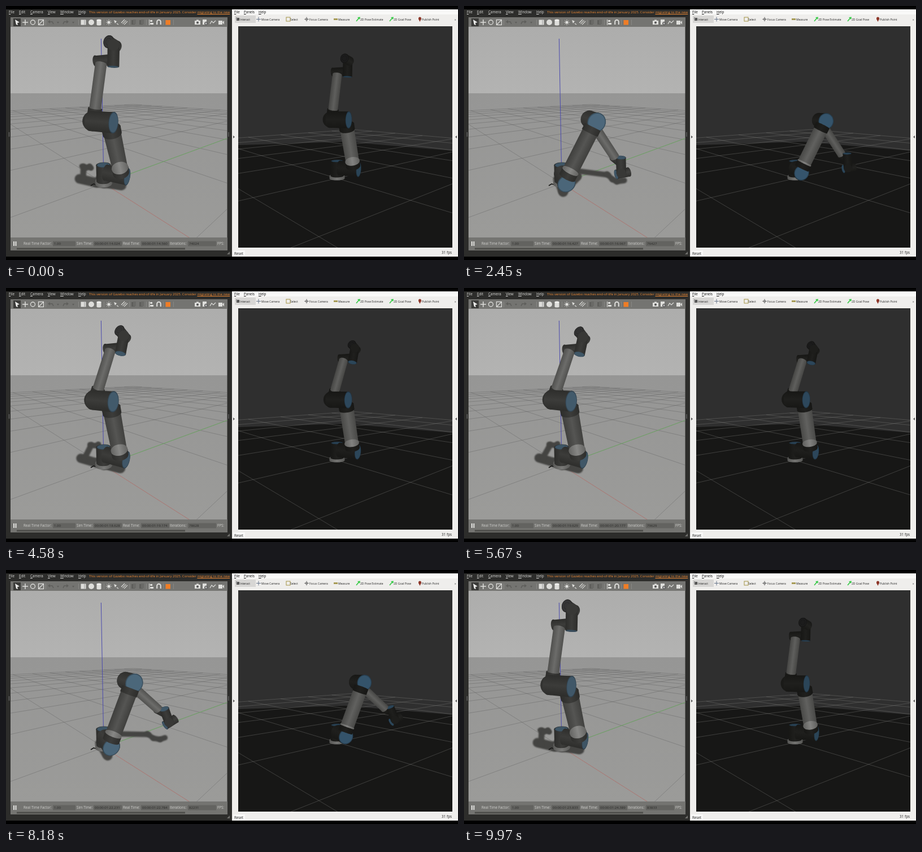
Animation of 800 by 451 pixels, one loop 10 s. Source, as an HTML page with a canvas:

```html
<!DOCTYPE html>
<html lang="en">
<head>
<meta charset="utf-8">
<title>Robot arm, two views</title>
<style>
html, body { margin: 0; width: 100%; height: 100%; overflow: hidden; background: #000; }
#stage { position: relative; width: 800px; height: 451px; overflow: hidden; }
canvas { position: absolute; left: 0; top: 0; }
#stage span { position: absolute; white-space: pre; line-height: 10px; font-family: "Open Sans", "Noto Sans", sans-serif; }
#stage u { text-decoration-thickness: .5px; text-underline-offset: 1px; }
</style>
</head>
<body>
<div id="stage"><canvas id="view" width="800" height="451"></canvas></div>
<script>
const stage = document.getElementById('stage');
const canvas = document.getElementById('view');
const ctx = canvas.getContext('2d');
const LOOP = 10000, PERIOD = 5000, LEAD = 110;
const rad = deg => deg * Math.PI / 180;

// Cameras: focal length, image centre, where the robot base appears and how far away it is.
const leftCam = {
  f: 331, cx: 200, cy: 224, pitch: rad(11.8), yaw: rad(129.5), base: [173, 315], z0: 1.95,
  tube: 79, fore: 100, hub: 56, ring: 125, cap: [78, 106, 126]
};
const rightCam = {
  f: 474, cx: 600, cy: 232.5, pitch: rad(6.2), yaw: rad(132), base: [586, 306], z0: 3.1,
  tube: 90, fore: 88, hub: 29, ring: 120, cap: [54, 86, 110]
};
let cam = leftCam;

// ---- 3D helpers, in metres with z up ----
const UP = [0, 0, 1];
const add = (p, d, k = 1) => p.map((v, i) => v + d[i] * k);
const flip = d => d.map(v => -v);
const mix = (a, b, k) => a.map((v, i) => v + (b[i] - v) * k);

function toCam([x, y, z]) {
  const r = x * Math.cos(cam.yaw) - y * Math.sin(cam.yaw);
  const q = x * Math.sin(cam.yaw) + y * Math.cos(cam.yaw);
  const sin = Math.sin(cam.pitch), cos = Math.cos(cam.pitch);
  return [
    (cam.base[0] - cam.cx) / cam.f * cam.z0 + r,
    (cam.base[1] - cam.cy) / cam.f * cam.z0 - sin * q - cos * z,
    cam.z0 + cos * q - sin * z
  ];
}
const screen = ([x, y, z]) => [cam.cx + cam.f * x / z, cam.cy + cam.f * y / z];
const project = p => screen(toCam(p));
const depth = p => Math.hypot(...toCam(p));
const pixels = (r, p) => r * cam.f / toCam(p)[2];

// ---- drawing helpers ----
const gray = v => { v = Math.round(v); return `rgb(${v},${v},${v - 2})`; };
function rect(x, y, w, h, fill) { ctx.fillStyle = fill; ctx.fillRect(x, y, w, h); }
function path(points, color, width) {
  ctx.beginPath();
  points.forEach(p => ctx.lineTo(p[0], p[1]));
  ctx.strokeStyle = color;
  ctx.lineWidth = width;
  ctx.stroke();
}
function shape(points, fill) {
  ctx.beginPath();
  points.forEach(p => ctx.lineTo(p[0], p[1]));
  ctx.fillStyle = fill;
  ctx.fill();
}
function oval(x, y, rx, ry, fill, stroke, width = 1) {
  ctx.beginPath();
  ctx.ellipse(x, y, rx, ry, 0, 0, 2 * Math.PI);
  if (fill) { ctx.fillStyle = fill; ctx.fill(); }
  if (stroke) { ctx.strokeStyle = stroke; ctx.lineWidth = width; ctx.stroke(); }
}
function fade(y0, y1, a, b) {
  const g = ctx.createLinearGradient(0, y0, 0, y1);
  g.addColorStop(0, a);
  g.addColorStop(1, b);
  return g;
}
function clipped(x, y, w, h, draw) {
  ctx.save();
  ctx.beginPath();
  ctx.rect(x, y, w, h);
  ctx.clip();
  draw();
  ctx.restore();
}
function label(x, base, size, color, html) {
  const el = document.createElement('span');
  el.style.cssText = `left:${x}px;top:${base - 5 - size * .36}px;font-size:${size}px;color:${color}`;
  el.innerHTML = html;
  stage.append(el);
  return el;
}

function line3(a, b, color, width) {
  const near = .2;
  let u = toCam(a), v = toCam(b);
  if (u[2] < near && v[2] < near) return;
  if (u[2] < near) u = mix(u, v, (near - u[2]) / (v[2] - u[2]));
  if (v[2] < near) v = mix(v, u, (near - v[2]) / (u[2] - v[2]));
  path([screen(u), screen(v)], color, width);
}
function grid(n, color) {
  for (let k = -n; k <= n; k++) {
    line3([-n, k, 0], [n, k, 0], color, .6);
    line3([k, -n, 0], [k, n, 0], color, .6);
  }
}
function disc(c, n, r, fill) {
  const side = Math.abs(n[2]) > .99 ? [1, 0, 0] : [-n[1], n[0], 0];
  const len = Math.hypot(...side), e = side.map(v => v / len);
  const g = [n[1] * e[2] - n[2] * e[1], n[2] * e[0] - n[0] * e[2], n[0] * e[1] - n[1] * e[0]];
  const rim = [];
  for (let i = 0; i < 32; i++) {
    const t = i * Math.PI / 16;
    rim.push(project(add(add(c, e, r * Math.cos(t)), g, r * Math.sin(t))));
  }
  shape(rim, fill);
}
// Coloured end plate, shown only when it faces the camera.
function plate(c, n, r, rgb) {
  const at = toCam(c), d = add(toCam(add(c, n)), at, -1);
  const facing = -(d[0] * at[0] + d[1] * at[1] + d[2] * at[2]) / Math.hypot(...at);
  if (facing <= 0) return;
  const shade = k => `rgb(${rgb.map(v => Math.round(v * k * (.68 + .32 * facing)))})`;
  disc(c, n, r, shade(.78));
  disc(c, n, r * .9, shade(1));
}
function ball(p, r, tone) {
  const [x, y] = project(p), w = pixels(r, p);
  oval(x, y, w, w, gray(tone));
}
function tube(a, b, r, tone) {
  const len = Math.hypot(...add(b, a, -1)), n = add(b, a, -1).map(v => v / len);
  const edge = gray(tone * .8);
  const p = project(a), q = project(b), wa = pixels(r, a), wb = pixels(r, b);
  const dx = q[0] - p[0], dy = q[1] - p[1], d = Math.hypot(dx, dy) || 1;
  const nx = -dy / d, ny = dx / d, w = Math.max(wa, wb);
  const g = ctx.createLinearGradient(p[0] - nx * w, p[1] - ny * w, p[0] + nx * w, p[1] + ny * w);
  g.addColorStop(0, edge);
  g.addColorStop(.5, gray(tone * 1.08));
  g.addColorStop(1, edge);
  disc(a, n, r, g);
  disc(b, n, r, g);
  shape([
    [p[0] - nx * wa, p[1] - ny * wa], [p[0] + nx * wa, p[1] + ny * wa],
    [q[0] + nx * wb, q[1] + ny * wb], [q[0] - nx * wb, q[1] - ny * wb]
  ], g);
}

// ---- robot ----
// Joint positions for swing s, from upright (0) to folded down (1).
function pose(s) {
  const turn = -rad(25 + 51 * s) - leftCam.yaw;
  const axis = [Math.cos(turn), Math.sin(turn), 0];
  const dir = deg => [-axis[1] * Math.cos(rad(deg)), axis[0] * Math.cos(rad(deg)), Math.sin(rad(deg))];
  const upper = dir(113 - 51 * s), fore = dir(74 - 131 * s);
  const drop = dir(88 - 175 * s), tool = dir(178 - 175 * s);
  const shoulder = [0, 0, .127];
  const elbow = add(shoulder, upper, .612);
  const wrist = add(elbow, fore, .53);
  const knuckle = add(wrist, axis, .164);
  const hand = add(knuckle, drop, .116);
  return { axis, upper, fore, drop, tool, shoulder, elbow, wrist, knuckle, hand };
}

function drawArm(j) {
  const { axis, upper, fore, drop, tool } = j, { hub, cap } = cam;
  const out = (p, k) => add(p, axis, k);
  const parts = [];
  const part = (mid, draw) => parts.push([depth(mid), draw]);

  part([0, 0, .08], () => {
    tube([0, 0, 0], [0, 0, .03], .088, cam.ring * .9);
    tube([0, 0, .03], [0, 0, .205], .075, hub);
    plate([0, 0, .205], UP, .068, cap);
  });
  part(out(j.shoulder, .16), () => {
    tube(out(j.shoulder, .03), out(j.shoulder, .262), .083, hub);
    plate(out(j.shoulder, .265), axis, .082, cap);
  });
  const upperArm = out(j.shoulder, .205);
  part(add(upperArm, upper, .3), () => {
    const at = k => add(upperArm, upper, k);
    tube(at(.04), at(.1), .08, hub);
    tube(at(.1), at(.5), .074, cam.tube);
    tube(at(.1), at(.112), .079, cam.ring);
    tube(at(.5), at(.56), .08, hub);
  });
  part(out(j.elbow, .12), () => {
    ball(out(j.elbow, .04), .086, hub * .9);
    tube(out(j.elbow, .02), out(j.elbow, .237), .086, hub);
    plate(out(j.elbow, .24), axis, .087, cap);
  });
  const foreArm = out(j.elbow, .049);
  part(add(foreArm, fore, .28), () => {
    const at = k => add(foreArm, fore, k);
    tube(at(.05), at(.11), .06, hub);
    tube(at(.11), at(.5), .05, cam.fore);
  });
  part(out(j.wrist, .07), () => {
    plate(out(j.wrist, -.012), flip(axis), .046, cap);
    tube(out(j.wrist, -.01), out(j.wrist, .16), .047, hub);
  });
  part(mix(j.knuckle, j.hand, .4), () => {
    tube(add(j.knuckle, drop, -.055), j.hand, .05, hub);
    plate(add(j.knuckle, drop, -.058), flip(drop), .049, cap);
    ball(j.hand, .049, hub);
  });
  part(add(j.hand, tool, .02), () => {
    tube(add(j.hand, tool, -.055), add(j.hand, tool, .085), .048, hub * 1.05);
    plate(add(j.hand, tool, -.058), flip(tool), .048, cap);
    plate(add(j.hand, tool, .087), tool, .046, [hub, hub, hub]);
    plate(add(j.hand, tool, .088), tool, .026, [hub, hub, hub]);
  });
  parts.sort((a, b) => b[0] - a[0]).forEach(p => p[1]());
}

function drawShadow(j) {
  const cast = p => [p[0] + .52 * p[2], p[1] - .1 * p[2], 0];
  const out = (p, k) => add(p, j.axis, k);
  const limb = (a, b, r) => {
    const u = cast(a), v = cast(b);
    path([project(u), project(v)], '#444442', 1.3 * pixels(r, u));
  };
  ctx.save();
  ctx.filter = 'blur(1.2px)';
  ctx.lineCap = 'round';
  limb([0, 0, 0], [0, 0, .2], .075);
  limb(j.shoulder, out(j.shoulder, .24), .08);
  limb(out(j.shoulder, .22), out(j.elbow, .22), .07);
  limb(j.elbow, out(j.elbow, .22), .08);
  limb(out(j.elbow, .049), out(j.wrist, .049), .05);
  limb(out(j.wrist, .02), j.knuckle, .047);
  limb(j.knuckle, j.hand, .047);
  limb(j.hand, add(j.hand, j.tool, .09), .047);
  ctx.restore();
  path([[150, 319], [155, 316], [166, 319]], '#1b1b1a', 1.8);
}

// ---- fixed scenery and window frames ----
function leftScene() {
  rect(8, 37, 384, 118, fade(37, 155, '#adadac', '#b3b3b2'));
  rect(8, 155, 384, 257, fade(155, 411, '#969695', '#9b9b99'));
  cam = leftCam;
  grid(10, 'rgba(85,85,84,.6)');
  line3([0, 0, 0], [0, -10, 0], '#6fa765', 1);
  line3([0, 0, 0], [-10, 0, 0], '#b87c78', .9);
  line3([0, 0, 0], [0, 0, 1.4], '#4a4aae', 1);
}
function rightScene() {
  rect(411, 36, 379, 393, '#2f2f2f');
  shape([[411, 247], [600, 241], [790, 257], [790, 429], [411, 429]], '#171716');
  cam = rightCam;
  grid(5, 'rgba(135,135,132,.6)');
}

function leftIcons() {
  const c = '#dededb', dim = '#5e5e5b';
  rect(13, 22, 13, 14, '#3a3a38');
  shape([[16, 24], [24, 29], [20, 30], [21, 34], [18, 33]], '#eeeeec');
  path([[34, 24], [34, 34]], c, 1.5);
  path([[29, 29], [39, 29]], c, 1.5);
  oval(47.5, 29, 4, 4, null, c, 1.3);
  path([[58, 33], [66, 25]], c, 1.3);
  ctx.strokeRect(57.5, 24.5, 9, 9);
  for (const [x, d] of [[79, 1], [106, -1]]) {
    path([[x + 5 * d, 32], [x + 3 * d, 28], [x - 3 * d, 28]], dim, 1.5);
    shape([[x - 5 * d, 28], [x - d, 25], [x - d, 31]], dim);
    shape([[x + 11, 28], [x + 15, 28], [x + 13, 31]], dim);
  }
  rect(132.5, 24.5, 9, 9, c);
  path([[139, 25], [139, 33]], '#999', 1);
  oval(151, 29, 5, 5, c);
  rect(160.5, 25, 8, 8, c);
  oval(164.5, 25, 4, 1.5, '#f2f2f0');
  oval(164.5, 33, 4, 1.5, c);
  oval(182, 29, 2.6, 2.6, c);
  for (let i = 0; i < 8; i++) {
    const u = Math.cos(i * Math.PI / 4), v = Math.sin(i * Math.PI / 4);
    path([[182 + 3.5 * u, 29 + 3.5 * v], [182 + 5 * u, 29 + 5 * v]], c, 1);
  }
  shape([[191, 25], [196, 27], [193, 31]], c);
  path([[196, 31], [199, 33]], c, 1.2);
  for (let i = 0; i < 3; i++) path([[204 + i * 2.5, 30 + i * 1.6], [210 + i * 2.5, 24 + i * 1.6]], c, 1.1);
  for (const x of [226, 240]) { rect(x - 4, 25, 6, 8, dim); rect(x - 1, 24, 5, 8, '#6a6a67'); }
  rect(253, 24, 1, 10, c); rect(255, 25, 4, 3, c); rect(255, 30, 6, 3, c);
  ctx.beginPath();
  ctx.arc(270.5, 28, 3.3, Math.PI, 0);
  ctx.lineTo(273.8, 33);
  ctx.moveTo(267.2, 28);
  ctx.lineTo(267.2, 33);
  ctx.lineWidth = 2;
  ctx.stroke();
  rect(282.5, 25, 8.5, 8.5, '#ef7d26');
  for (const x of [70, 128, 173, 218, 248, 278, 296]) rect(x, 24, .7, 10, '#90908d');
  rect(334, 26, 10, 7, c); rect(337, 24.5, 4, 2, c); oval(339, 29.5, 2, 2, '#555');
  rect(348, 24, 7, 9, c); oval(354, 31, 2.5, 2.5, '#aaa', '#444');
  path([[361, 32], [364, 27], [367, 30], [371, 26]], c, 1.2);
  rect(376, 26, 7, 7, c);
  shape([[383, 29], [386, 26], [386, 33]], c);
}

function rightIcons() {
  const cross = (x, c) => { path([[x - 4, 23.5], [x + 4, 23.5]], c, 1); path([[x, 19.5], [x, 27.5]], c, 1); };
  rect(405, 17, 37, 13, '#d7d6d4');
  rect(408, 21, 5, 5, '#555');
  rect(407, 20, 2, 4, '#999');
  cross(447, '#66748a');
  ctx.strokeStyle = '#a39444';
  ctx.strokeRect(496, 20, 7, 7);
  cross(532, '#777');
  oval(532, 23.5, 2, 2, null, '#777');
  rect(580, 22, 7, 3, '#a79b55');
  for (const x of [623, 682]) {
    path([[x - 3, 27], [x + 2, 21]], '#35ca45', 1.6);
    shape([[x + 4, 19.5], [x + 3, 24], [x - 1, 20]], '#35ca45');
  }
  oval(732.5, 22, 2.5, 2.5, '#8d3527');
  shape([[730, 23], [735, 23], [732.5, 28]], '#8d3527');
}

function chrome() {
  rect(0, 0, 800, 451, '#000');
  rect(0, 6, 400, 439, '#2d2d2b');
  rect(8, 20, 384, 17, '#747471');
  rect(8, 411, 384, 23, '#747471');
  for (const [x, w] of [[83, 40], [155, 50], [239, 50], [322, 50]]) rect(x, 417.5, w, 9, '#636360');
  rect(13, 418, 2, 8, '#e4e4e1');
  rect(16.5, 418, 2, 8, '#e4e4e1');
  rect(19, 429.5, 298, 3, '#4e4e4b');
  for (const x of [5, 393.5]) rect(x, 224, 1, 8, '#777');
  shape([[391, 441], [396, 436], [396, 441]], '#70706d');
  rect(400, 6, 400, 439, '#efeeec');
  rect(400, 6, 400, 9, '#f9f9f8');
  rect(402, 434, 21, 10, '#f8f8f7');
  shape([[402, 230], [405, 232.5], [402, 235]], '#555');
  shape([[798, 230], [795, 232.5], [798, 235]], '#555');
  leftIcons();
  rightIcons();
}
const inLeft = draw => clipped(8, 37, 383.5, 374, draw);
const inRight = draw => clipped(411, 36, 379, 393, draw);

function labels() {
  const menu = (items, base, size, color) => items.forEach(([x, t]) =>
    label(x, base, size, color, `<u>${t[0]}</u>${t.slice(1)}`));
  menu([[5, 'File'], [23, 'Edit'], [43, 'Camera'], [74, 'View'], [96, 'Window'], [128, 'Help']], 13.6, 6.3, '#dcdcda');
  menu([[404, 'File'], [421, 'Panels'], [447, 'Help']], 12.8, 6.2, '#111');
  const note = label(147, 13.6, 6, '#ef8a35',
    'This version of Gazebo reaches end-of-life in January 2025. Consider <u>migrating to the new</u>');
  note.style.width = '253px';
  note.style.overflow = 'hidden';
  [[414, 'Interact'], [452, 'Move Camera'], [503, 'Select'], [537, 'Focus Camera'], [588, 'Measure'],
   [627, '2D Pose Estimate'], [686, '2D Goal Pose'], [736, 'Publish Point'], [794, '»']]
    .forEach(([x, t]) => label(x, 25.4, 5, '#222', t));
  [[31, 'Real Time Factor:'], [125, 'Sim Time:'], [207, 'Real Time:'], [290, 'Iterations:'], [374, 'FPS:']]
    .forEach(([x, t]) => label(x, 424.3, 6.2, '#d2d2cf', t));
  label(85, 424.3, 6.1, '#2b2b29', '1.00');
  label(404, 441.8, 6.2, '#222', 'Reset');
  label(771, 440.3, 6.4, '#222', '31 fps');
}

chrome();
inLeft(leftScene);
inRight(rightScene);
const backdrop = document.createElement('canvas');
backdrop.width = 800;
backdrop.height = 451;
backdrop.getContext('2d').drawImage(canvas, 0, 0);
labels();
const [simText, realText, stepText] = [157, 241, 324].map(x => label(x, 424.3, 6.1, '#2b2b29', ''));

const clock = ms => '00:00:01:' + (ms / 1000).toFixed(3);
function counters(t) {
  const k = Math.floor((t + 25) / 200);
  const sim = 14024 + 200 * k + Math.floor(.17 * k + .99);
  simText.textContent = clock(sim);
  realText.textContent = clock(14560 + 200 * k + Math.floor(.58 * k + .9));
  stepText.textContent = 60000 + sim;
}

function frame() {
  const t = performance.now() % LOOP;
  const j = pose((1 - Math.cos((t - LEAD) / PERIOD * 2 * Math.PI)) / 2);
  ctx.drawImage(backdrop, 0, 0);
  cam = leftCam;
  inLeft(() => { drawShadow(j); drawArm(j); });
  cam = rightCam;
  inRight(() => drawArm(j));
  counters(t);
  requestAnimationFrame(frame);
}
frame();
</script>
</body>
</html>
```
